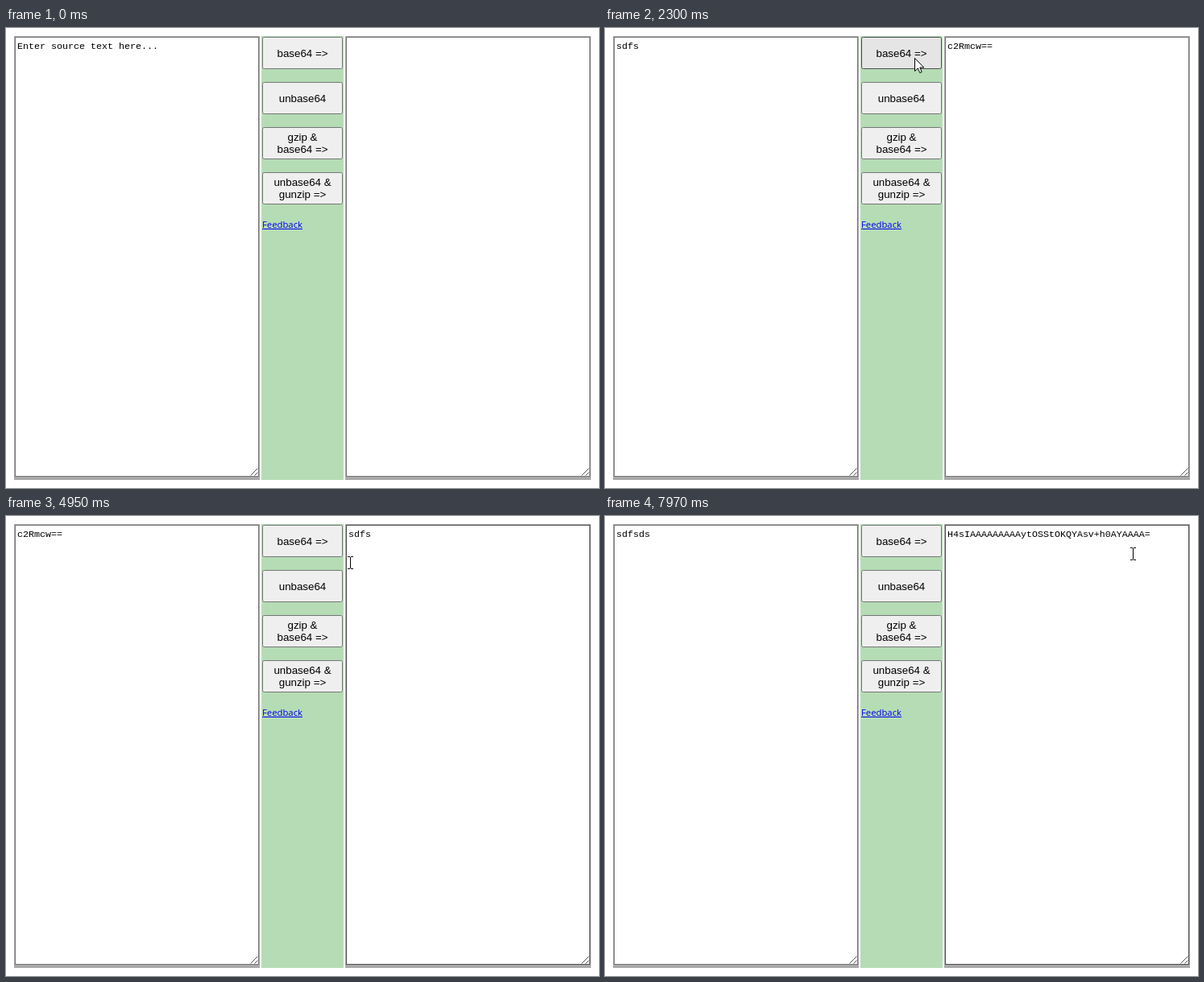
An HTML page for the animation above (8 s loop, 736x571 px).

```html
<!DOCTYPE html>
<html lang="en">
<head>
<meta charset="utf-8">
<title>base64 converter</title>
<style>
  html, body { margin: 0; width: 100%; height: 100%; overflow: hidden; background: #fff; }
  svg { display: block; }
  text { white-space: pre; }
  .mono { font: 11.667px "Liberation Mono", monospace; }
  .label { font: 13.333px "Liberation Sans", sans-serif; text-anchor: middle; }
  .link { font: 11.3px "Open Sans", sans-serif; fill: #00e; }
</style>
</head>
<body>
<svg id="stage" width="736" height="571" viewBox="0 0 736 571"></svg>
<script>
const LOOP = 8000, CHAR = 7;
const stage = document.getElementById('stage');

function add(tag, attrs, content) {
  const el = document.createElementNS('http://www.w3.org/2000/svg', tag);
  set(el, attrs);
  if (content) el.textContent = content;
  return stage.appendChild(el);
}
function set(el, attrs) {
  for (const key in attrs) el.setAttribute(key, attrs[key]);
}
function show(el, visible) {
  el.style.display = visible ? '' : 'none';
}
function rect(x, y, width, height, attrs) {
  return add('rect', { x, y, width, height, ...attrs });
}
function inside(p, box) {
  return p.x >= box.x && p.x < box.x + box.w && p.y >= box.y && p.y < box.y + box.h;
}

function makePane(x) {
  const box = { x, y: 11, w: 303, h: 546 };
  rect(x - 1, 10, 305, 551, { fill: '#a9a9a9' });
  const frame = rect(x + .5, 11.5, 302, 545, { fill: '#fff' });
  const mark = rect(x, 14, 0, 15, { fill: '#3297fd' });
  const plain = add('text', { class: 'mono', x: x + 3, y: 26 });
  const picked = add('text', { class: 'mono', y: 26, fill: '#fff' });
  const caret = rect(0, 15, 1, 13, {});
  const ring = [
    rect(x - .5, 10.5, 304, 547, { fill: 'none', stroke: '#fff', rx: 2.5 }),
    rect(x + 1, 12, 301, 544, { fill: 'none', stroke: '#101010', 'stroke-width': 2, rx: 2 })
  ];
  add('path', { d: `M${x + 292.5} 555.5l9-9m-4 9l4-4`, stroke: '#555', fill: 'none' });

  function draw(text, focused, hovered, from, caretOn) {
    const end = text.length, left = x + 3;
    set(frame, { stroke: hovered ? '#4f4f4f' : '#767676' });
    ring.forEach(r => show(r, focused));
    plain.textContent = text.slice(0, from);
    picked.textContent = text.slice(from);
    set(picked, { x: left + from * CHAR });
    set(mark, { x: left + from * CHAR, width: (end - from) * CHAR });
    set(caret, { x: left + end * CHAR });
    show(caret, focused && from === end && caretOn);
  }
  return { box, draw };
}

function makeButton(y, lines) {
  const face = rect(318.5, y + .5, 99, 39, { rx: 2 });
  const first = y + (lines.length > 1 ? 17 : 25);
  lines.forEach((line, i) => add('text', { class: 'label', x: 368, y: first + i * 15 }, line));
  return { box: { x: 318, y, w: 100, h: 40 }, face };
}

const panes = { left: makePane(11), right: makePane(422) };
rect(317, 10, 102, 551, { fill: '#b5dcb5' });
const buttons = [
  ['base64 =>'], ['unbase64'], ['gzip &', 'base64 =>'], ['unbase64 &', 'gunzip =>']
].map((lines, i) => makeButton(11 + i * 56, lines));
add('text', { class: 'link', x: 318, y: 248 }, 'Feedback');
rect(318, 249, 50, 1, { fill: '#00e' });

const arrow = add('path', {
  d: 'M.5 .5V16.5L4.3 13L6.8 18.6L9.2 17.6L6.8 12H11.8Z', fill: '#fff', stroke: '#000'
});
const beam = add('path', {
  d: 'M-3-7.5h3M1-7.5h3M.5-7V7M-3 7.5h3M1 7.5h3', stroke: '#000', fill: 'none'
});

// Bursts of screen updates: start, end, number of steps.
const bursts = [
  [70, 690, 9], [910, 1690, 11], [1760, 2000, 4], [2160, 2780, 9], [2930, 3710, 11],
  [3770, 3850, 2], [4080, 4690, 9], [4870, 5630, 11], [5700, 5800, 2], [6020, 6100, 2],
  [6250, 6350, 2], [6490, 6720, 4], [6890, 7650, 11], [7730, 7970, 4]
];

// Pointer path: time, x, y.
const path = [
  [70, 569, 6], [147, 300, 25], [225, 205, 24], [380, 190, 23], [612, 40, 24], [690, 20, 24],
  [1066, 197, 47], [1378, 197, 47], [1534, 290, 66], [1690, 372, 84], [2000, 384, 37],
  [2315, 384, 37], [2470, 490, 24], [2547, 488, 22], [2702, 420, 9], [2780, 405, 22],
  [2930, 392, 28], [3242, 296, 76], [3476, 150, 45], [3710, 62, 24], [3770, 58, 23],
  [3850, 17, 22], [4080, 17, 22], [4308, 386, 120], [4461, 372, 92], [4690, 370, 88],
  [4870, 384, 76], [5022, 470, 40], [5174, 460, 36], [5402, 300, 50], [5630, 184, 40],
  [5700, 180, 39], [5800, 180, 39], [6100, 21, 42], [6350, 203, 75], [6720, 203, 75],
  [6890, 230, 88], [7194, 370, 140], [7650, 372, 146], [7730, 410, 130], [7810, 480, 95],
  [7970, 655, 47]
];

// Each entry changes only the listed properties.
const script = [
  [0, { left: 'Enter source text here...', right: '', focus: '', sel: '', press: -1 }],
  [300, { focus: 'left', sel: 'drag' }],
  [685, { sel: 'all' }],
  [1140, { left: 's', sel: '' }],
  [1220, { left: 'sd' }],
  [1298, { left: 'sdf' }],
  [1370, { left: 'sdfs' }],
  [2160, { focus: '', press: 0 }],
  [2230, { right: 'c2Rmcw==', press: -1 }],
  [2545, { focus: 'right', sel: 'drag' }],
  [2775, { sel: 'all' }],
  [3770, { focus: 'left', sel: 'drag' }],
  [3850, { sel: 'all' }],
  [4080, { left: 'c2Rmcw==', sel: '' }],
  [4610, { focus: '', press: 1 }],
  [4685, { right: 'sdfs', press: -1 }],
  [5800, { focus: 'left' }],
  [6020, { sel: 'drag' }],
  [6100, { sel: 'all' }],
  [6490, { left: 's', sel: '' }],
  [6560, { left: 'sdf' }],
  [6640, { left: 'sdfs' }],
  [6715, { left: 'sdfsds' }],
  [7570, { focus: '', press: 2 }],
  [7645, { right: 'H4sIAAAAAAAAAytOSStOKQYAsv+h0AYAAAA=', press: -1 }]
];

function snap(t) {
  let shown = 0;
  for (const [start, end, count] of bursts) {
    if (t < start) break;
    const step = (end - start) / (count - 1);
    shown = Math.min(end, start + Math.floor((t - start) / step + .25) * step);
  }
  return shown;
}

function pointerAt(t) {
  const next = path.findIndex(p => p[0] > t);
  if (next === 0) return { x: -50, y: -50 };
  if (next < 0) return { x: path.at(-1)[1], y: path.at(-1)[2] };
  const [t0, x0, y0] = path[next - 1], [t1, x1, y1] = path[next];
  const k = (t - t0) / (t1 - t0);
  return { x: Math.round(x0 + (x1 - x0) * k), y: Math.round(y0 + (y1 - y0) * k) };
}

function stateAt(t) {
  const state = { since: 0 };
  for (const [time, change] of script) {
    if (time <= t) Object.assign(state, change, { since: time });
  }
  return state;
}

function draw(time) {
  const t = snap(time % LOOP), p = pointerAt(t), s = stateAt(t);
  const dragging = s.sel === 'drag';
  const caretOn = (t - s.since) % 1000 < 500;

  for (const name in panes) {
    const { box, draw } = panes[name], focused = s.focus === name, end = s[name].length;
    let from = end;
    if (focused && s.sel === 'all') from = 0;
    if (focused && dragging) {
      from = Math.max(0, Math.min(end, Math.round((p.x - box.x - 3) / CHAR)));
    }
    draw(s[name], focused, !dragging && inside(p, box), from, caretOn);
  }

  buttons.forEach(({ box, face }, i) => {
    const hovered = !dragging && inside(p, box);
    const [fill, stroke] = s.press === i ? ['#f5f5f5', '#8d8d8d']
      : hovered ? ['#e5e5e5', '#4f4f4f'] : ['#efefef', '#767676'];
    set(face, { fill, stroke });
  });

  const overText = dragging || inside(p, panes.left.box) || inside(p, panes.right.box);
  show(beam, overText);
  show(arrow, !overText);
  set(overText ? beam : arrow, { transform: `translate(${p.x} ${p.y})` });
}

const begin = performance.now();
function tick() {
  draw(performance.now() - begin);
  requestAnimationFrame(tick);
}
tick();
</script>
</body>
</html>
```
